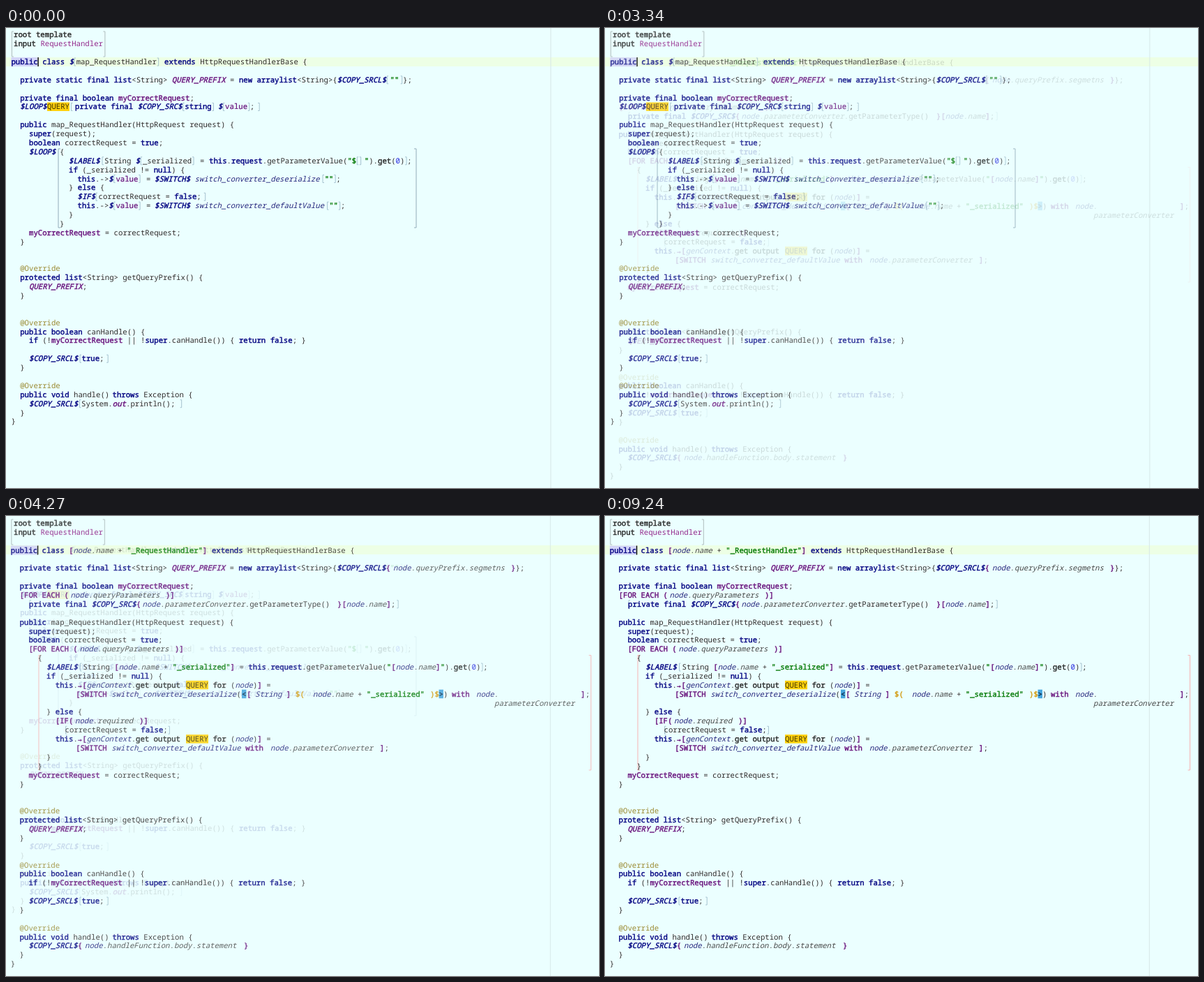
Recreate the animation shown at these times as an HTML page. Size 850 by 659 pixels, loop 9810 ms.

```html
<!DOCTYPE html>
<html lang="en">
<head>
<meta charset="utf-8">
<title>Template before and after</title>
<style>
  html, body { margin: 0; width: 100%; height: 100%; overflow: hidden; background: #ebffff; }
  svg { display: block; width: 850px; height: 659px; }
  text { white-space: pre; text-rendering: geometricPrecision; }
  .code { font: 400 10.67px "Noto Sans Mono", "DejaVu Sans Mono", monospace; font-variant-ligatures: none; }
  .label { font: 500 43.4px Roboto, sans-serif; fill: #8d898d; text-anchor: end; opacity: 0; }
</style>
</head>
<body>
<svg id="stage" viewBox="0 0 850 659"></svg>
<script>
const LOOP = 9810;
const CELL = 6.402, PITCH = 12.885, HALF_CELL = 3.7;
const FADE = 'cubic-bezier(.35, .3, .6, 1)';
const stage = document.getElementById('stage');

// style letter: [colour, extra stroke, italic]
const MEDIUM = 0.4;
const STYLES = {
  p: ['#302a2a', 0],
  r: ['#262626', MEDIUM],
  k: ['#000080', MEDIUM],
  i: ['#000080', MEDIUM, true],
  j: ['#25257c', 0, true],
  e: ['#484848', 0, true],
  m: ['#660e7a', MEDIUM],
  v: ['#660e7a', 0.2],
  f: ['#660e7a', MEDIUM, true],
  q: ['#94298c', 0],
  s: ['#067a06', MEDIUM],
  a: ['#9b8a31', 0],
  n: ['#2a2ae0', 0],
  o: ['#d29a10', MEDIUM],
  h: ['#3b3000', 0],
  H: ['#103050', MEDIUM],
};
const MARKS = { h: '#ffd10d', H: '#45a5de' };

// In the listings "~k" switches style, "~90:k" also moves to x = 90; style b draws thin brackets.
const header = `~11:rroot template
~11:rinput ~qRequestHandler
`;
const prefixField = '  ~kprivate static final list~p<String> ~fQUERY_PREFIX ~p= ~knew arraylist~p<String>{~i$COPY_SRCL$';
const flagField = '  ~kprivate final boolean ~mmyCorrectRequest~p;';
const constructor = `  ~kpublic ~pmap_RequestHandler(HttpRequest request) {
    ~ksuper~p(request);
    ~kboolean ~pcorrectRequest = ~ktrue~p;`;
const methods = `    ~mmyCorrectRequest ~p= correctRequest;
  }


  ~a@Override
  ~kprotected list~p<String> getQueryPrefix() {
    ~fQUERY_PREFIX~p;
  }


  ~a@Override
  ~kpublic boolean ~pcanHandle() {
    ~kif ~p(!~mmyCorrectRequest ~p|| !~ksuper~p.canHandle()) { ~kreturn false~p; }

    ~i$COPY_SRCL$~105:b[~108.5:ktrue~p;~143.5:b]
  }

  ~a@Override
  ~kpublic void ~phandle()~152.5:kthrows ~pException {`;
const ending = `  }
}`;
const assign = (name, x) =>
  `~102.5:kthis~p.->~i$~b[~vvalue~b]~201:p=~213:i$SWITCH$ ~jswitch_converter_${name}~${x}:b[~s""~b]~p;`;
const output = '          ~kthis~p.~m→[~jgenContext~p.~rget output ~258:hQUERY~r for ~p(~jnode~p)~m] ~p=';

const before = `${header}
~kpublic class ~i$~b[~pmap_RequestHandler~216:b]~227:kextends ~pHttpRequestHandlerBase {

${prefixField}~b[~550.5:s""~565:b]~569:p};

${flagField}
  ~i$LOOP$~59:hQUERY~92.5:b[~99:kprivate final ~i$COPY_SRC$~b[~kstring~b]~304:i$~b[~vvalue~b]~p;~360.5:b]

${constructor}
    ~i$LOOP$~77:p{
~90:i$LABEL$~137:b[~141:pString ~i$~b[~p_serialized~b]~278:p= ~291:kthis~p.~krequest~p.getParameterValue(~s"$~b[]~513.8:s"~p).~533:rget~p(~n0~p)~b]~p;
~90:kif ~p(_serialized != ~knull~p) {
${assign('deserialize', 453)}
~90:p} ~kelse ~p{
~102.5:i$IF$~b[~132.5:pcorrectRequest = ~kfalse~p;~283:b]
${assign('defaultValue', 459.5)}
~90:p}
~77:p}
${methods}
    ~i$COPY_SRCL$~104.5:b[~108:pSystem.~fout~p.println();~249:b]
${ending}`;

const after = `${header}
~kpublic class ~m[~jnode~e.name ~p+ ~s"_RequestHandler"~m] ~kextends ~pHttpRequestHandlerBase {

${prefixField}~m{~555:jnode~e.queryPrefix.segmetns~724:m}~p};

${flagField}
  ~m[FOR EACH (~92.5:jnode~e.queryParameters~229:m)]
~33:b[~33:kprivate final ~i$COPY_SRC$~m{~195.5:jnode~e.parameterConverter~p.getParameterType()~475:m}[~jnode~e.name~m]~p;~559.5:b]

${constructor}
    ~m[FOR EACH (~105.5:jnode~e.queryParameters~242:m)]
~45.5:p{
~58.2:i$LABEL$~105.5:b[~110.5:pString ~m[~jnode~e.name ~p+ ~s"_serialized"~m]~p = ~kthis~p.~krequest~p.getParameterValue(~s"~m[~jnode~e.name~m]~s"~p).~rget~p(~n0~p)~b]~p;
        ~kif ~p(_serialized != ~knull~p) {
${output}
~100:m[SWITCH ~jswitch_converter_deserialize~p(~338:H<~345:m[~357:jString~402:m]~415:o$(~440:jnode~e.name ~p+ ~s"_serialized"~608:o)$~620.5:H>~p)~639:mwith~674:jnode~e.~824:m]~p;
~700:eparameterConverter
        ~p} ~kelse ~p{
          ~m[IF(~99:jnode~e.required~191:m)]
~84.5:b[~84.5:pcorrectRequest = ~kfalse~p;~b]
${output}
~100:m[SWITCH ~jswitch_converter_defaultValue~m with~379:jnode~e.parameterConverter~536:m]~p;
        }
~45.5:p}
${methods}
    ~i$COPY_SRCL$~m{~113:jnode~e.handleFunction.body.statement~341:m}
${ending}`;

function add(parent, tag, attrs, text) {
  const node = document.createElementNS('http://www.w3.org/2000/svg', tag);
  for (const key in attrs) node.setAttribute(key, attrs[key]);
  if (text !== undefined) node.textContent = text;
  parent.appendChild(node);
  return node;
}

const box = (parent, x, y, width, height, fill) =>
  add(parent, 'rect', { x, y, width, height, fill });

function bracket(parent, x, top, bottom, tick, stroke, width = 1) {
  add(parent, 'path', {
    d: `M${x + tick} ${top}H${x}V${bottom}H${x + tick}`,
    fill: 'none', stroke, 'stroke-width': width,
  });
}

function drawRun(parent, style, x, y, text) {
  if (style === 'b') {
    for (const char of text) {
      const open = char === '[';
      bracket(parent, x + (open ? 1 : 2.7), y - 9, y + 2, open ? 2 : -2, '#9fbccb', 0.9);
      x += HALF_CELL;
    }
    return x;
  }
  const [color, stroke, italic] = STYLES[style];
  const width = text.length * CELL;
  if (MARKS[style]) box(parent, x, y - 10, width, 12.5, MARKS[style]);
  if (text.trim()) {
    add(parent, 'text', {
      x, y, class: 'code', fill: color, stroke: color, 'stroke-width': stroke,
      style: `font-style:${italic ? 'italic' : 'normal'}`,
    }, text);
  }
  return x + width;
}

function drawListing(listing, left, firstBaseline, block) {
  const layer = add(stage, 'g', {});
  const top = firstBaseline + 3 * PITCH - 10;
  box(layer, left, top, 38, 13, '#d3d5f8');
  box(layer, left + 773, 0, 1, 659, '#d6e6e6');
  bracket(layer, left + 1, 5, 41, 2.5, '#afbcbc');
  bracket(layer, left + 134.5, 5, 41, -2.5, '#afbcbc');
  bracket(layer, block.left, block.top, block.bottom, 3, block.color);
  bracket(layer, block.right, block.top, block.bottom, -3, block.color);

  listing.split('\n').forEach((line, row) => {
    const y = firstBaseline + row * PITCH;
    const parts = line.split(/~(?:([\d.]+):)?([a-zA-Z])/);
    let x = drawRun(layer, 'p', left, y, parts[0]);
    for (let n = 1; n < parts.length; n += 3) {
      const [jump, style, text] = parts.slice(n, n + 3);
      x = drawRun(layer, style, jump ? +jump : x, y, text);
    }
  });
  box(layer, left + 38, top, 1.4, 13, '#000');
  return layer;
}

function loop(node, steps) {
  const frames = steps.map(([time, opacity, easing = 'steps(1, end)']) =>
    ({ offset: time / LOOP, opacity, easing }));
  node.animate(frames, { duration: LOOP, iterations: Infinity });
}

const crossfade = (node, from, to) =>
  loop(node, [[0, from], [3040, from, FADE], [4840, to], [LOOP, to]]);

function showLabel(text, from, to) {
  const label = add(stage, 'text', { x: 829, y: 42, class: 'label' }, text);
  loop(label, [[0, 0], [from, 1], [to, 0], [LOOP, 0]]);
}

box(stage, 0, 42, 850, 13, '#edffe5');
crossfade(drawListing(before, 7.4, 13.4, { left: 75, right: 588, top: 173, bottom: 286, color: '#92abb9' }), 1, 0);
crossfade(drawListing(after, 6.8, 13.9, { left: 47, right: 838.5, top: 199.5, bottom: 364, color: '#f7b3b3' }), 0, 1);
showLabel('BEFORE', 370, 3040);
showLabel('AFTER', 4840, 9240);
</script>
</body>
</html>
```
